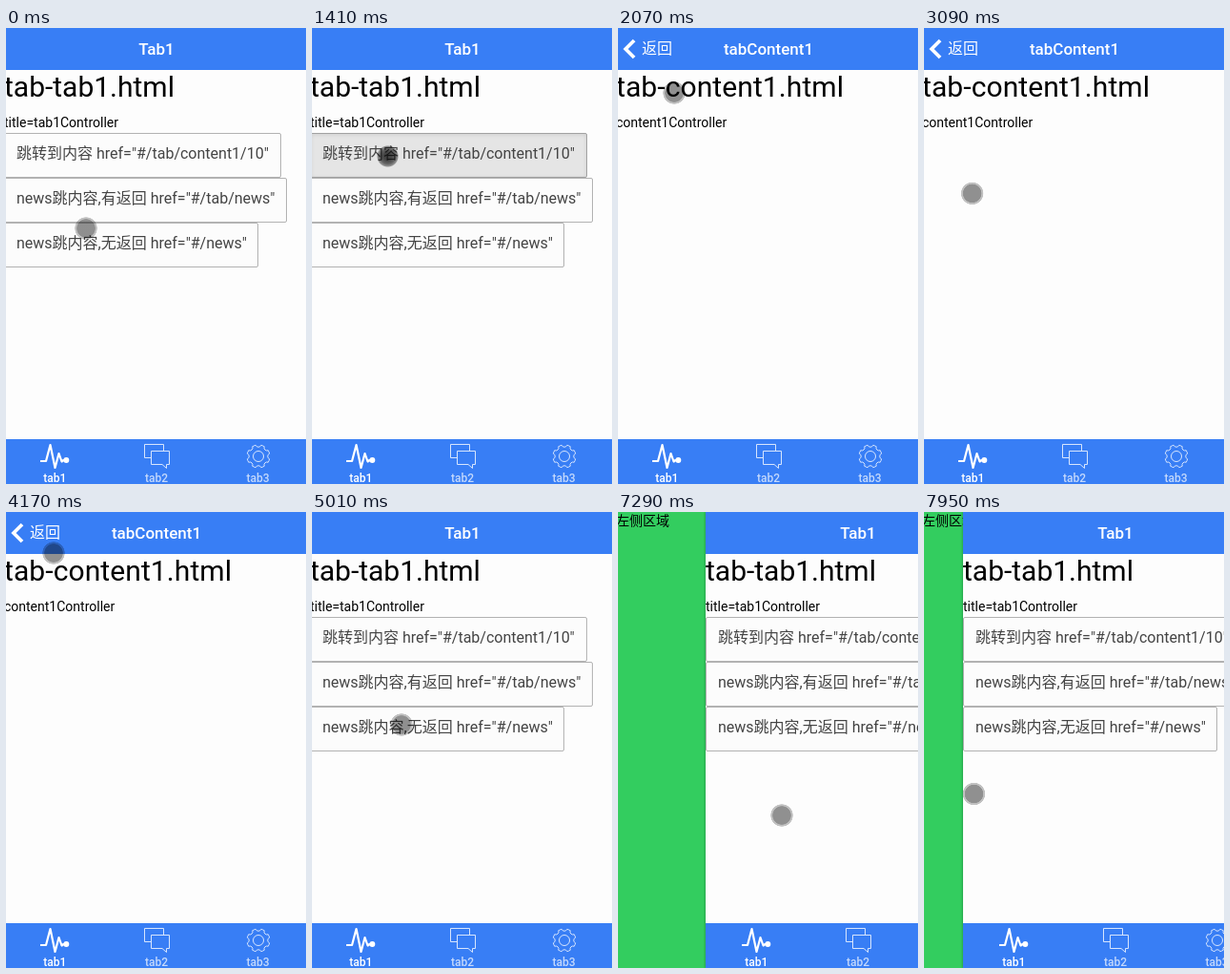
These frames come from a looping animation (315x478 px, 8000 ms). An HTML page:

```html
<!DOCTYPE html>
<html lang="zh-CN">
<head>
<meta charset="utf-8">
<title>Tabs demo</title>
<style>
html, body { margin: 0; width: 100%; height: 100%; overflow: hidden; }
body { background: #33cd5f; font: 14px/20px Roboto, "Noto Sans CJK SC", "Noto Sans CJK", sans-serif; color: #000; }
#stage { position: relative; width: 315px; height: 478px; overflow: hidden; background: #33cd5f; }
#stage div { position: absolute; white-space: nowrap; box-sizing: border-box; }
#side { left: -2px; top: -1px; font-weight: 300; }
#page { left: -2px; top: 0; width: 320px; height: 478px; background: #fdfdfd; box-shadow: -1px 0 2px rgba(0,0,0,.2); }
#clip { left: 0; top: 0; width: 320px; height: 478px; overflow: hidden; }
.view { left: 0; top: 44px; width: 320px; height: 387px; background: #fdfdfd; }
.head { left: 0; top: 0; font-size: 30px; line-height: 36px; }
#detail .head { letter-spacing: .1px; }
.sub { left: 0; top: 45px; }
.btn { left: 0; height: 47px; padding: 0 12px; border: 1px solid #b2b2b2; border-radius: 2px; font-size: 16px; line-height: 42px; color: #444; background: #fcfcfc; }
.btn.on { background: #e5e5e5; border-color: #a2a2a2; box-shadow: inset 0 1px 4px rgba(0,0,0,.1); }
.bar { left: 0; width: 320px; background: #387ef5; color: #fff; }
#top { top: 0; height: 44px; overflow: hidden; }
#tabs { top: 431px; height: 49px; }
.title { left: 0; width: 320px; text-align: center; font-size: 17px; font-weight: 500; line-height: 44px; }
#back { left: 0; top: 0; width: 70px; height: 44px; }
#back div { left: 27px; top: 0; font-size: 16px; font-weight: 300; line-height: 43px; }
.tab { top: 34px; width: 106.67px; text-align: center; font-size: 12px; font-weight: 500; line-height: 14px; opacity: .7; }
.tab.on { opacity: 1; }
svg { position: absolute; left: 0; top: 0; fill: none; stroke: #fff; }
#dot { left: -12px; top: -12px; width: 24px; height: 24px; border-radius: 50%; background: radial-gradient(circle, rgba(0,0,0,.43) 9.4px, rgba(0,0,0,.24) 10px, rgba(0,0,0,.24) 11.4px, transparent 12px); }
#dot.on { background: radial-gradient(circle, rgba(0,0,0,.7) 4px, rgba(0,0,0,.56) 8px, rgba(0,0,0,.36) 10.5px, transparent 11.5px); }
</style>
</head>
<body>
<div id="stage">
  <div id="side">左侧区域</div>
  <div id="page"><div id="clip">
    <div class="view" id="list">
      <div class="head">tab-tab1.html</div>
      <div class="sub">title=tab1Controller</div>
      <div class="btn" id="go" style="top:66px;width:291px">跳转到内容 href="#/tab/content1/10"</div>
      <div class="btn" style="top:113px;width:297px">news跳内容,有返回 href="#/tab/news"</div>
      <div class="btn" style="top:160px;width:267px">news跳内容,无返回 href="#/news"</div>
    </div>
    <div class="view" id="detail">
      <div class="head">tab-content1.html</div>
      <div class="sub">content1Controller</div>
    </div>
    <div class="bar" id="top">
      <div class="title" id="name1">Tab1</div>
      <div class="title" id="name2">tabContent1</div>
      <div id="back">
        <svg width="28" height="44" viewBox="-2 0 28 44" stroke-width="3.8"><path d="M17 13L8 22L17 31"/></svg>
        <div>返回</div>
      </div>
    </div>
    <div class="bar" id="tabs">
      <svg width="320" height="47" viewBox="-2 431 320 47">
        <path d="M36 454H42L46.5 437L51.5 461L55.5 446L58.5 454.5L60.5 453H63" stroke-width="2.2" stroke-linejoin="round"/>
        <circle cx="63.3" cy="453" r="3" fill="#fff" stroke="none"/>
        <g opacity=".8">
          <path d="M152.5 450.5H145.5V436.5H165.5V443.5"/>
          <path d="M152.5 443.5H171.5V457.5H168.5V461.5L164 457.5H152.5Z"/>
          <path id="gear" stroke-linejoin="round"/>
          <circle cx="265" cy="449" r="5.5"/>
        </g>
      </svg>
      <div class="tab on" style="left:0">tab1</div>
      <div class="tab" style="left:106.67px">tab2</div>
      <div class="tab" style="left:213.33px">tab3</div>
    </div>
  </div></div>
  <div id="dot"></div>
</div>
<script>
const LOOP = 8000, STEP = 120, WIDTH = 320;
const PRESS = 1410, OPEN = 1560, BACK = 4440, CLOSE = 4590;
const el = id => document.getElementById(id);

// Pointer legs: arrival time, steps taken, x, y
const LEGS = [
  [0, 1, 84, 210], [390, 3, 79.5, 134.5],
  [2070, 4, 59, 68], [2310, 2, 28.5, 27],
  [2820, 3, 76, 162], [3390, 4, 18, 188],
  [3660, 2, 273, 187], [4170, 4, 50, 43],
  [4860, 3, 94, 266], [5010, 1, 94, 223], [5400, 4, 94, 181],
  [6080, 1, 92, 272], [6480, 1, 155, 461],
  [6750, 2, 87, 357], [7140, 3, 41, 318],
  [7290, 1, 172, 318], [7800, 4, 146, 312], [7950, 1, 52.5, 295.5]
];
// Side menu: time, width
const MENU = [[0, 0], [7290, 94], [7410, 275], [7950, 43]];

const within = (t, a, b) => t >= a && t < b;
const clamp = v => Math.min(1, Math.max(0, v));
const ease = (v, power) => 1 - (1 - clamp(v)) ** power;
const ticks = (t, from) => Math.floor((t - from) / STEP);
const slide = (t, from) => ease((ticks(t, from) + .5) * STEP / 500, 4);

function pointer(t) {
  let x = 0, y = 0;
  for (const [end, steps, tx, ty] of LEGS) {
    const f = ease((ticks(t, end) + steps) / steps, 2);
    x += (tx - x) * f;
    y += (ty - y) * f;
  }
  return [x, y];
}

// Eight teeth divided by round notches, one notch at the top
function gearPath(cx, cy, r) {
  const slice = Math.PI / 4, half = .3 * slice;
  const at = a => `${(cx + r * Math.sin(a)).toFixed(2)} ${(cy - r * Math.cos(a)).toFixed(2)}`;
  let d = "M" + at(-half);
  for (let i = 0; i < 8; i++) {
    d += `A3 3 0 0 0 ${at(i * slice + half)}A${r} ${r} 0 0 1 ${at((i + 1) * slice - half)}`;
  }
  return d + "Z";
}

function place(id, x, opacity) {
  el(id).style.transform = `translateX(${x}px)`;
  el(id).style.opacity = opacity;
}

function draw(t) {
  const q = slide(t, OPEN) - slide(t, CLOSE);
  const pressing = within(t, PRESS, OPEN), returning = within(t, BACK, CLOSE);

  place("list", -.33 * WIDTH * q, 1 - .1 * q);
  place("detail", WIDTH * (1 - q), 1);
  place("name1", -110 * q, 1 - q);
  place("name2", 150 * (1 - q), q);
  place("back", 0, returning ? .3 : q);
  place("page", MENU.findLast(m => m[0] <= t)[1], 1);
  el("go").classList.toggle("on", pressing);

  const [x, y] = pointer(t), dot = el("dot");
  dot.style.visibility = within(t, 6230, 6480) ? "hidden" : "visible";
  dot.style.transform = `translate(${x}px, ${y}px)`;
  dot.classList.toggle("on", pressing || returning);
}

el("gear").setAttribute("d", gearPath(265, 449, 12));
const start = performance.now();
function tick() {
  draw((performance.now() - start) % LOOP);
  requestAnimationFrame(tick);
}
tick();
</script>
</body>
</html>
```
